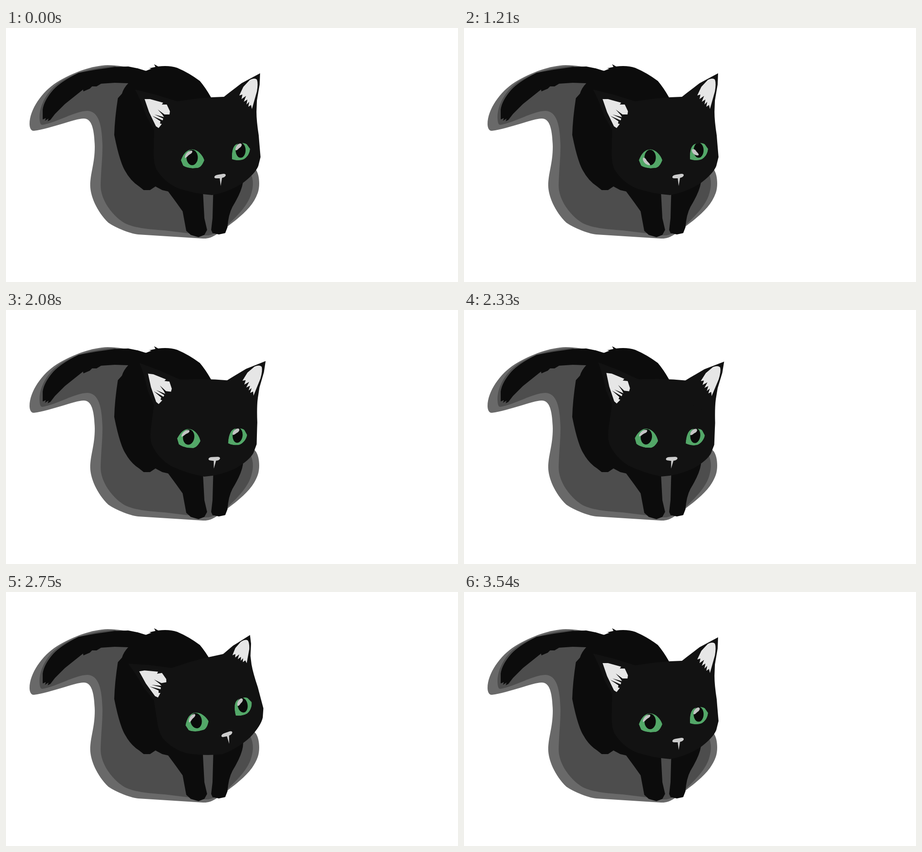
These frames come from a looping animation (998x561 px, 4250 ms). An HTML page:

```html
<!DOCTYPE html>
<html lang="en">
<head>
<meta charset="utf-8">
<title>Cat</title>
<style>
  html, body { margin: 0; height: 100%; overflow: hidden; background: #fff; }
  svg { display: block; width: 100vw; height: 100vh; }
</style>
</head>
<body>
<svg viewBox="0 0 998 561">
  <defs>
    <path id="eyeL" d="M386 292C392 276 400 268 412 268C424 269 434 280 438 292C434 302 430 307 424 309L412 310C402 309 395 307 391 304Z"/>
    <path id="eyeR" d="M499 290C498 275 500 262 508 257C515 253 528 253 532 257L539 267C538 278 532 286 525 290C517 293 508 293 499 290Z"/>
    <clipPath id="clipL"><use href="#eyeL"/></clipPath>
    <clipPath id="clipR"><use href="#eyeR"/></clipPath>
  </defs>

  <!-- shadow -->
  <path fill="#696969" d="M52 212C52 180 80 140 112 120C150 97 190 83 225 82Q245 82 270 87L450 200L552 313C560 325 561 350 556 364C545 395 520 415 487 440C465 455 455 466 435 465L292 456C275 455 240 440 226 430C200 405 186 370 186 348C186 320 196 300 196 262C195 225 190 200 172 200C155 199 100 222 62 227C55 228 52 220 52 212Z"/>
  <path fill="#4d4d4d" d="M74 195C75 168 92 138 118 120C155 96 200 86 240 84L450 200L540 320C547 335 546 350 542 364C536 390 510 416 487 437C470 450 455 459 440 458L350 447C310 444 285 442 262 431C235 415 209 380 209 348C210 310 213 290 213 260C212 215 205 184 180 183C150 184 115 208 80 214C75 214 74 205 74 195Z"/>

  <!-- tail, body, legs -->
  <g fill="#0c0c0c">
    <path d="M81 202L81 180Q84 160 104 137Q120 119 160 99Q200 91 240 86L270 85L290 89L310 95L300 125L270 122L240 121L210 123L200 129L190 129L185 134L171 140L170 136L155 148L130 168L108 190L98 203L92 206L94 200L86 205L88 199Z"/>
    <path d="M270 122L290 89L308 95L321 90L316 89L330 86L327 80L336 85Q360 82 378 88Q404 99 428 117Q440 131 452 152L500 250L524 330L523 342Q520 362 500 395Q491 412 489 440L484 453L470 456L456 453L453 446L456 420L458 345L434 345L438 420L444 446L438 457L425 462L408 457L398 448L390 405L375 384L358 361L345 358L330 350L318 358L304 358L294 350Q275 338 262 314Q250 292 239 236Q240 200 247 155L256 145Q260 132 270 122Z"/>
  </g>

  <g id="head" fill="#121212">
    <path d="M285 136L330 147L378 162L420 156L455 153L480 152L530 150L553 185Q553 205 558 237L559 250L562 285L557 305Q550 322 522 343Q490 363 455 369Q415 366 380 354Q350 341 332 312Q325 297 326 270L327 225L310 195Q298 160 285 136Z"/>
    <path fill="#e6e6e6" d="M306 157L318 157L347 165L344 169L355 169L362 184L361 191L350 191L335 180L345 191L349 197L328 191L347 200L346 204L323 194L341 206L340 211L344 212L337 221L331 217L316 186Z"/>
    <g id="ear">
      <path d="M480 153L490 145L520 122L561 100L560 125L554 160L553 185L540 215L490 200Z"/>
      <path fill="#e6e6e6" d="M515 149L524 130L538 115Q549 109 554 114Q557 122 554 140L543 179L541 170L535 174L537 163L531 169L533 158L525 163L530 150L520 157L522 147Z"/>
    </g>

    <g clip-path="url(#clipL)">
      <use href="#eyeL" fill="#53a768"/>
      <ellipse cx="411" cy="286" rx="12.5" ry="17" fill="#0a0a0a"/>
      <path id="shineL" fill="#c4c4c4" d="M395 287C394 280 402 270 410 271C413 272 411 277 406 279C401 282 399 287 395 287Z"/>
      <path class="lid" d="M380 259Q412 275 444 259V180H380Z"/>
    </g>
    <g clip-path="url(#clipR)">
      <use href="#eyeR" fill="#53a768"/>
      <ellipse cx="518" cy="270" rx="11" ry="16.5" fill="#0a0a0a"/>
      <path id="shineR" fill="#c4c4c4" d="M507 270C505 264 511 255 518 255C522 256 521 261 517 264C513 266 511 271 507 270Z"/>
      <path class="lid" d="M495 253Q520 260 542 231V160H495Z"/>
    </g>
    <path fill="#ccc" d="M460 329Q461 325 468 324L480 322Q486 322 485 326Q483 330 477 331L474 349L472 332L464 332Q460 332 460 329Z"/>
  </g>
</svg>
<script>
const FPS = 24, FRAMES = 102;
const $ = id => document.getElementById(id);
const lids = document.querySelectorAll('.lid');

// Linear interpolation through [frame, value] keys.
function track(keys, f) {
  if (f <= keys[0][0]) return keys[0][1];
  for (let i = 1; i < keys.length; i++) {
    const [a, from] = keys[i - 1], [b, to] = keys[i];
    if (f <= b) return from + (to - from) * (f - a) / (b - a);
  }
  return keys[keys.length - 1][1];
}

const blink = [[0, 0], [12, 1], [24, 0]];
const shine = [[25, 0], [41, -360]];
const tilt = [[47, 0], [53.5, 14], [64, -15], [70, 0]];
const twitch = [[77, 0], [81, 15], [85, 0]];

function draw(now) {
  const f = Math.floor(now * FPS / 1000 + 0.1) % FRAMES;

  const drop = 43 * track(blink, f);
  lids.forEach(lid => lid.setAttribute('transform', `translate(0 ${drop})`));

  const spin = track(shine, f);
  $('shineL').setAttribute('transform', `rotate(${spin} 411 287)`);
  $('shineR').setAttribute('transform', `rotate(${spin} 518 270)`);

  // Tilting left also lifts the head and foreshortens the far ear.
  const angle = track(tilt, f), lean = Math.min(angle, 0);
  $('head').setAttribute('transform',
    `translate(${0.42 * lean} ${0.84 * lean}) rotate(${angle} 455 215)`);
  $('ear').setAttribute('transform',
    `translate(0 185) scale(1 ${1 + 0.024 * lean}) translate(0 -185) rotate(${track(twitch, f)} 498 168)`);
}

const start = performance.now();
(function loop() {
  draw(performance.now() - start);
  requestAnimationFrame(loop);
})();
</script>
</body>
</html>
```
